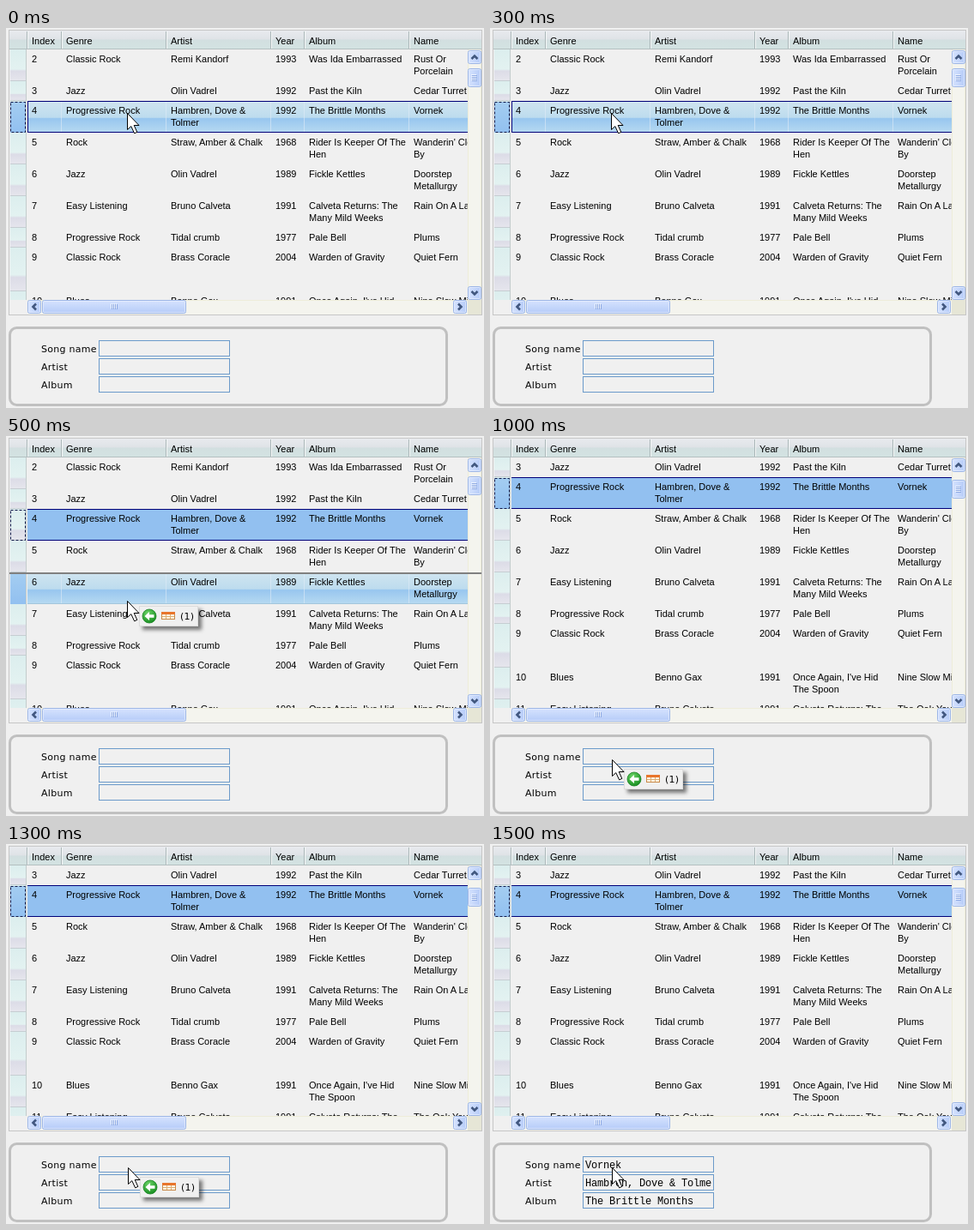
These frames come from a looping animation (557x443 px, 2000 ms). An HTML page:

```html
<!DOCTYPE html>
<html lang="en">
<head>
<meta charset="utf-8">
<title>Drag a row into a form</title>
<style>
  html, body { margin: 0; width: 557px; height: 443px; overflow: hidden; background: #f0f0f0; }
  svg { display: block; }
  text { font: 11px "Liberation Sans", Arial, sans-serif; fill: #000; white-space: pre; }
  .label { font: 11px "DejaVu Sans", Verdana, sans-serif; letter-spacing: .28px; }
  .value { font: 12px "Liberation Mono", "Courier New", monospace; letter-spacing: -.2px; }
  #badge { filter: drop-shadow(4px 4px 2px rgba(0, 0, 0, .5)); }
</style>
</head>
<body>
<svg id="stage" width="557" height="443" viewBox="0 0 557 443">
  <defs>
    <linearGradient id="head" x2="0" y2="1">
      <stop offset="0" stop-color="#e8eaee"/><stop offset=".45" stop-color="#dfe3e7"/>
      <stop offset=".5" stop-color="#d2dfe0"/><stop offset="1" stop-color="#d3e3e2"/>
    </linearGradient>
    <linearGradient id="mark" x2="0" y2="1">
      <stop offset="0" stop-color="#dceeee"/><stop offset=".62" stop-color="#e3f2f1"/>
      <stop offset=".68" stop-color="#dcdce7"/><stop offset="1" stop-color="#e6e6ed"/>
    </linearGradient>
    <linearGradient id="hot" x2="0" y2="1">
      <stop offset="0" stop-color="#cfe4f0"/><stop offset=".52" stop-color="#bddcee"/>
      <stop offset=".56" stop-color="#98c6ef"/><stop offset="1" stop-color="#b5d9f1"/>
    </linearGradient>
    <linearGradient id="hotMark" x2="0" y2="1">
      <stop offset="0" stop-color="#a4cdf1"/><stop offset="1" stop-color="#92c0f0"/>
    </linearGradient>
    <linearGradient id="barV"><stop offset="0" stop-color="#d6e3fe"/><stop offset="1" stop-color="#b5cbf8"/></linearGradient>
    <linearGradient id="barH" x2="0" y2="1"><stop offset="0" stop-color="#d6e3fe"/><stop offset="1" stop-color="#b5cbf8"/></linearGradient>
    <radialGradient id="green" cx=".4" cy=".3" r=".75">
      <stop offset="0" stop-color="#6fd66a"/><stop offset="1" stop-color="#128a1c"/>
    </radialGradient>
    <clipPath id="view"><path d="M4 25H538V317H4Z"/></clipPath>
    <clipPath id="fields"><path d="M109 360H258V430H109Z"/></clipPath>
  </defs>
</svg>
<script>
const NS = 'http://www.w3.org/2000/svg';
const stage = document.getElementById('stage');

function add(parent, tag, attrs = {}, content) {
  const el = document.createElementNS(NS, tag);
  for (const key in attrs) el.setAttribute(key, attrs[key]);
  if (content !== undefined) el.textContent = content;
  parent.append(el);
  return el;
}
const group = (parent, attrs) => add(parent, 'g', attrs);
const rect = (parent, x, y, width, height, fill, more) =>
  add(parent, 'rect', { x, y, width, height, fill, ...more });
const line = (parent, d, stroke, more) => add(parent, 'path', { d, stroke, fill: 'none', ...more });
const text = (parent, x, y, str, cls = '') => add(parent, 'text', { x, y, class: cls }, str);

// One value per half second, held until the next.
function steps(el, prop, values) {
  const frames = values.map((v, i) => ({ [prop]: v, offset: i / values.length, easing: 'step-end' }));
  frames.push({ [prop]: values.at(-1), offset: 1 });
  el.animate(frames, { duration: 500 * values.length, iterations: Infinity });
}
const show = (el, ...on) => steps(el, 'opacity', on);
const move = (el, ...points) =>
  steps(el, 'transform', points.map(([x, y]) => `translate(${x}px, ${y}px)`));

const columns = [['Index', 25], ['Genre', 65], ['Artist', 187], ['Year', 309], ['Album', 348], ['Name', 470]];
const dividers = columns.slice(1).map(c => c[1] - 1);

// height, then one entry per column; "|" breaks the line
const rows = [
  [37, '2', 'Classic Rock', 'Remi Kandorf', '1993', 'Was Ida Embarrassed', 'Rust Or|Porcelain'],
  [23, '3', 'Jazz', 'Olin Vadrel', '1992', 'Past the Kiln', 'Cedar Turret'],
  [37, '4', 'Progressive Rock', 'Hambren, Dove &|Tolmer', '1992', 'The Brittle Months', 'Vornek'],
  [37, '5', 'Rock', 'Straw, Amber & Chalk', '1968', 'Rider Is Keeper Of The|Hen', "Wanderin' Close|By"],
  [37, '6', 'Jazz', 'Olin Vadrel', '1989', 'Fickle Kettles', 'Doorstep|Metallurgy'],
  [37, '7', 'Easy Listening', 'Bruno Calveta', '1991', 'Calveta Returns: The|Many Mild Weeks', 'Rain On A Lamp'],
  [23, '8', 'Progressive Rock', 'Tidal crumb', '1977', 'Pale Bell', 'Plums'],
  [51, '9', 'Classic Rock', 'Brass Coracle', '2004', 'Warden of Gravity', 'Quiet Fern'],
  [37, '10', 'Blues', 'Benno Gax', '1991', "Once Again, I've Hid|The Spoon", 'Nine Slow Miles'],
  [37, '11', 'Easy Listening', 'Bruno Calveta', '1991', 'Calveta Returns: The|Many Mild Weeks', 'The Oak You Drew']
];

function hotRow(parent, y, h) {
  const g = group(parent);
  rect(g, 25, y + 1, 513, h - 2, 'url(#hot)');
  line(g, dividers.map(x => `M${x + .5} ${y + 1}v${h - 2}`).join(''), '#dfecf7', { 'stroke-opacity': .6 });
  return g;
}
const hotMark = (parent, y, h) => rect(parent, 5, y + 1, 18, h - 1, 'url(#hotMark)');

function drawRows() {
  const list = group(group(stage, { 'clip-path': 'url(#view)' }));
  let y = 25;
  for (const [h, ...cells] of rows) {
    rect(list, 5, y, 18, h, 'url(#mark)');
    line(list, `M5 ${y + h - .5}H23`, '#c6cdd2');
    if (cells[0] === '4') {
      rect(list, 25, y, 513, h, '#92c0f0');
      const hot = hotRow(list, y, h);
      line(hot, `M25.5 ${y}v${h}`, '#000078');
      show(hot, 1, 0, 0, 0);
      show(hotMark(list, y, h), 1, 0, 1, 1);
      line(list, `M25 ${y + .5}H538M25 ${y + h - .5}H538`, '#000078');
      rect(list, 5.5, y + 1.5, 17, h - 2, 'none', { stroke: '#101848', 'stroke-dasharray': '3 2' });
    }
    if (cells[0] === '6') {
      const hot = hotRow(list, y, h);
      hotMark(hot, y, h);
      line(hot, `M25 ${y + h - .5}H538`, '#a3c6dc');
      show(hot, 0, 1, 0, 0);
    }
    cells.forEach((cell, i) => cell.split('|').forEach((str, n) =>
      text(list, columns[i][1] + 5, y + 15 + 14 * n, str)));
    y += h;
  }
  line(list, 'M23.5 0V420', '#c3cccc');
  move(list, [0, 0], [0, 0], [0, -37], [0, -37]);
}

function drawHeader() {
  rect(stage, 4, 3, 550, 22, 'url(#head)');
  line(stage, 'M4 24.5H554', '#b4bfc0');
  for (const [name, x] of columns) {
    line(stage, `M${x - .5} 4V24`, '#aab6b8');
    line(stage, `M${x + .5} 4V24`, '#f4f7f7');
    text(stage, x + 5, 19, name);
  }
}

function thumb(parent, x, y, w, h, fill) {
  rect(parent, x + .5, y + .5, w - 1, h - 1, fill, { rx: 2, stroke: '#9db6e6' });
  rect(parent, x + 1.5, y + 1.5, w - 3, h - 3, 'none', { rx: 1, stroke: '#e9f0ff', 'stroke-opacity': .7 });
}

function button(x, y, angle) {
  thumb(stage, x, y, 16, 16, 'url(#barV)');
  line(stage, 'M-3.5 2L0 -1.5L3.5 2', '#41577f', {
    'stroke-width': 2.6, transform: `translate(${x + 8} ${y + 8}) rotate(${angle})`
  });
}

function drawScrollbars() {
  rect(stage, 538, 25, 16, 292, '#f4f4ee');
  rect(stage, 25, 317, 513, 17, '#f4f4ee');
  rect(stage, 538, 317, 16, 17, '#e6e6d6');
  line(stage, 'M25 317.5H538M538.5 25V317M553.5 25V317', '#eeedd9');
  button(538, 26, 0);
  button(538, 301, 180);
  button(25, 317, -90);
  button(521, 317, 90);

  thumb(stage, 42, 317, 168, 16, 'url(#barH)');
  for (let i = 0; i < 4; i++) {
    line(stage, `M${122.5 + 2 * i} 321v6`, '#eef4fe');
    line(stage, `M${123.5 + 2 * i} 322v6`, '#8ca8e2');
  }
  const slider = group(stage);
  thumb(slider, 538, 0, 16, 22, 'url(#barV)');
  for (let i = 0; i < 4; i++) {
    line(slider, `M542 ${7.5 + 2 * i}h6`, '#eef4fe');
    line(slider, `M543 ${8.5 + 2 * i}h6`, '#8ca8e2');
  }
  move(slider, [0, 47], [0, 47], [0, 51], [0, 51]);
}

function drawForm() {
  rect(stage, 4.5, 349.5, 509, 90, 'none', { rx: 8, stroke: '#c0c0c0', 'stroke-width': 3 });
  const filled = group(stage, { 'clip-path': 'url(#fields)' });
  const fields = [['Song name', 'Vornek'], ['Artist', 'Hambren, Dove & Tolmer'], ['Album', 'The Brittle Months']];
  fields.forEach(([label, value], i) => {
    const y = 364 + 21 * i;
    text(stage, 41, y + 14, label, 'label');
    rect(stage, 108.5, y + .5, 152, 18, 'none', { stroke: '#6b9aca' });
    text(filled, 111, y + 14, value, 'value');
  });
  show(filled, 0, 0, 0, 1);
}

function drawBadge() {
  const g = group(stage, { id: 'badge' });
  rect(g, .5, .5, 68, 23, '#f0f0f0', { stroke: '#dcdcdc' });
  add(g, 'circle', { cx: 12, cy: 12, r: 8, fill: 'url(#green)', stroke: '#1b8424', 'stroke-width': .8 });
  add(g, 'path', { d: 'M6.5 12L12 7V10.2H17.5V13.8H12V17Z', fill: '#fff' });
  rect(g, 26.5, 7.5, 15, 8, '#fff6e4', { stroke: '#c98a4a' });
  rect(g, 26, 7, 16, 3, '#e8752c');
  line(g, 'M27 12.5H41M31.5 10V15M36.5 10V15', '#dcb078');
  text(g, 48, 16, '(1)', 'label');
  show(g, 0, 1, 1, 0);
  move(g, [155, 198], [155, 198], [156, 388], [156, 388]);
}

function drawCursor() {
  const arrow = add(stage, 'path', {
    d: 'M.5 .5V19.5L4.8 15.6L8.6 23.8L11.8 22.4L8.2 14.5H14Z', fill: '#fff', stroke: '#000'
  });
  move(arrow, [141, 99], [141, 192], [142, 377], [142, 377]);
}

drawRows();
drawHeader();
drawScrollbars();
rect(stage, 3.5, 2.5, 551, 332, 'none', { stroke: '#c6c6c6' });
show(rect(stage, 4, 159, 550, 2, '#808080'), 0, 1, 0, 0);
drawForm();
drawBadge();
drawCursor();
</script>
</body>
</html>
```
